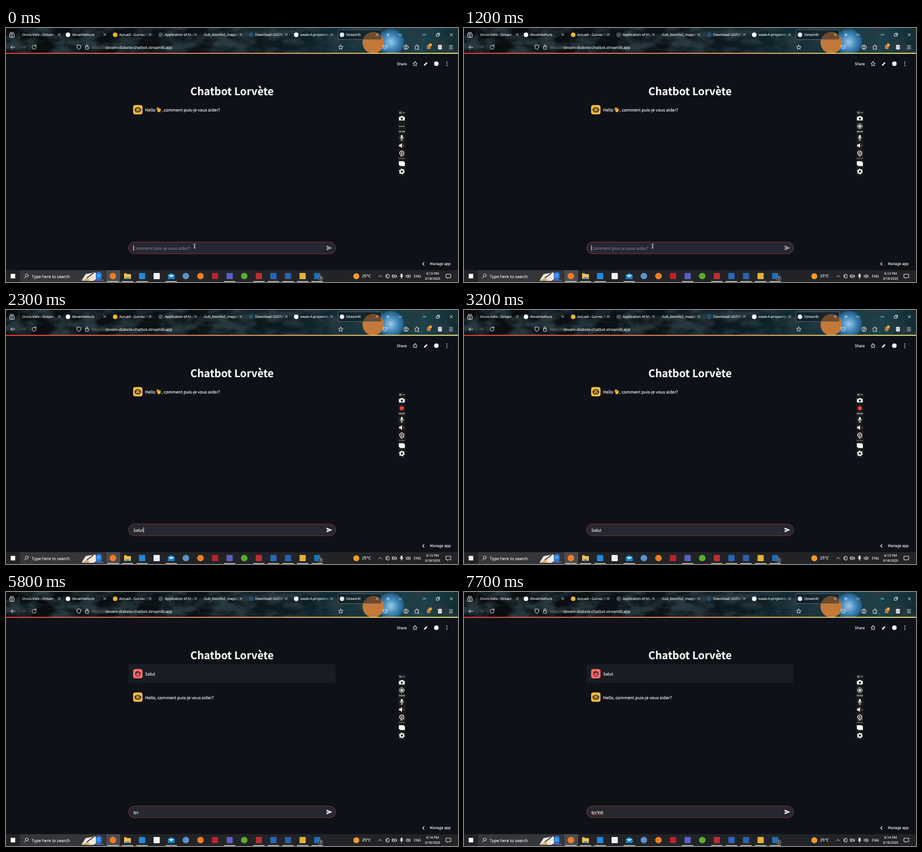
An HTML page that plays this animation: 800 px wide and 450 px high, repeating every 8000 ms.

```html
<!DOCTYPE html>
<html lang="fr">
<head>
<meta charset="utf-8">
<title>Chatbot</title>
<style>
  html, body { margin: 0; width: 100%; height: 100%; overflow: hidden; background: #0e1117; }
  svg { display: block; }
  text { fill: #fafafa; stroke: #fafafa; stroke-width: .12; text-rendering: geometricPrecision; white-space: pre; }
  .app text { font: 7.46px "Noto Sans CJK JP", "Noto Sans CJK SC", "Noto Sans", sans-serif; }
  .app .title { font-size: 18.6px; font-weight: 700; text-anchor: middle; }
  .app .small { font-size: 6.5px; }
  .app .hint { fill: #8b8d95; stroke: none; }
  .ui text { font: 6.15px "Open Sans", "Noto Sans", sans-serif; }
  .line { fill: none; stroke: #f2f2f4; stroke-linecap: round; stroke-linejoin: round; }
  .ink { fill: none; stroke: #11141a; stroke-width: 1.1; stroke-linejoin: round; }
</style>
</head>
<body>
<svg width="800" height="450" viewBox="0 0 800 450">
  <defs>
    <linearGradient id="sky">
      <stop offset="0" stop-color="#090c0f"/><stop offset=".45" stop-color="#0b1216"/>
      <stop offset=".64" stop-color="#0d1d24"/><stop offset=".76" stop-color="#113039"/>
      <stop offset=".92" stop-color="#1b444e"/><stop offset="1" stop-color="#11292f"/>
    </linearGradient>
    <filter id="cloud" x="0" y="0" width="1" height="1">
      <feTurbulence type="fractalNoise" baseFrequency=".025 .05" numOctaves="4" seed="5"/>
      <feColorMatrix values="0 0 0 0 .02  0 0 0 0 .04  0 0 0 0 .05  0 3 0 0 -1.1"/>
    </filter>
    <radialGradient id="glow">
      <stop offset="0" stop-color="#9accea"/><stop offset=".5" stop-color="#4288b9"/>
      <stop offset=".85" stop-color="#235f8a"/><stop offset="1" stop-color="#12394c" stop-opacity="0"/>
    </radialGradient>
    <linearGradient id="bar">
      <stop offset="0" stop-color="#ff4b4b"/><stop offset="1" stop-color="#fffd80"/>
    </linearGradient>
    <linearGradient id="fade" gradientUnits="userSpaceOnUse" x1="-11" x2="0">
      <stop offset="0" stop-color="#f4f4f6"/><stop offset="1" stop-color="#f4f4f6" stop-opacity="0"/>
    </linearGradient>
    <clipPath id="top"><rect width="800" height="44.5"/></clipPath>
    <g id="bot">
      <rect width="16.6" height="16.6" rx="4" fill="#ffbd45"/>
      <path class="ink" d="M8.3 5V3.6M4.6 5.2h7.4v7H4.6zM4.4 7.4H3v2.4h1.4M12.2 7.4h1.4v2.4h-1.4M6.4 10.6h3.8"/>
      <circle cx="6.6" cy="8" r=".9" fill="#11141a"/><circle cx="10" cy="8" r=".9" fill="#11141a"/>
    </g>
    <g id="user">
      <rect width="16.6" height="16.6" rx="4" fill="#ff6c6c"/>
      <circle class="ink" cx="8.3" cy="8.5" r="4.2"/>
      <path class="ink" d="M4.3 7.8Q6.6 7.4 7.4 5.1Q9.2 7.6 12.3 7.2"/>
      <circle cx="6.8" cy="9.3" r=".7" fill="#11141a"/><circle cx="9.9" cy="9.3" r=".7" fill="#11141a"/>
    </g>
    <path id="star" d="M0-4L1.2-1.3 4-1 1.9.9 2.5 3.7 0 2.3-2.5 3.7-1.9.9-4-1-1.2-1.3z"/>
  </defs>

  <g class="ui">
    <g clip-path="url(#top)">
      <rect width="800" height="45" fill="url(#sky)"/>
      <g id="stars"></g>
      <rect width="800" height="45" filter="url(#cloud)"/>
      <circle cx="681" cy="25" r="26" fill="url(#glow)"/>
      <circle cx="650" cy="26" r="19" fill="#c2793a"/>
    </g>
    <rect x="587.5" y="3" width="77" height="17.5" rx="2" fill="#0c1118" fill-opacity=".45" stroke="#747c8a" stroke-width=".7"/>
    <path d="M22.5 3v17" stroke="#3c3d43" stroke-width=".6"/>
    <g id="tabs"></g>
    <g class="line" stroke-width=".9">
      <rect x="6.5" y="10" width="8" height="6.5" rx="1"/><path d="M7.5 8h6M9 12.3h3M9 14.3l1.5 1 1.5-1"/>
      <path d="M673.5 12h5M676 9.5v5M694.5 10.8l3 2.6 3-2.6M738 12h5M762 10.6h4v4h-4zM763.4 9.2h4v4M786 9.8l4.4 4.4M790.4 9.8L786 14.2"/>
      <path d="M15.5 34h-6.6M11.7 31l-3 3 3 3"/>
      <path d="M28.5 34h6M31.7 31.2l3 2.8-3 2.8" stroke="#55565c"/>
      <path d="M52.6 31.6a3.6 3.6 0 1 0 .9 2.4M53.2 29.6v2.4h-2.4"/>
      <path d="M129 30l3.4 1v3q0 2.6-3.4 4-3.4-1.4-3.4-4v-3z"/>
      <rect x="140.5" y="33" width="5.6" height="4.6" rx=".8"/><path d="M141.7 33v-1.5a1.6 1.6 0 0 1 3.2 0V33"/>
      <use href="#star" x="592.5" y="34"/>
      <path d="M667.5 31h7v3a3.5 3.5 0 0 1-7 0zM669.5 33.3l1.5 1.5 1.5-1.5"/>
      <circle cx="708" cy="34" r="4"/><circle cx="708" cy="32.8" r="1.2"/><path d="M705.6 36.7q2.4-2.4 4.8 0"/>
      <path d="M724.5 32h2v-1.2a1 1 0 0 1 2 0V32h2v2h-1a1.2 1.2 0 0 0 0 2.3h1v1.5h-6z"/>
      <path d="M784.5 31.2h6M784.5 34h6M784.5 36.8h6"/>
    </g>
    <rect x="745" y="30" width="6.5" height="7.5" rx="1" fill="#c9793c"/>
    <rect x="748.5" y="27.5" width="5" height="5" rx="1" fill="#e6ad35"/>
    <rect x="764.7" y="30" width="6.6" height="8" rx=".8" fill="#eceef2"/>
    <path d="M766 32.5h4M766 34.3h4M766 36.1h3" stroke="#77808c" stroke-width=".6"/>
    <text x="152.3" y="36.7" style="font-size:6.85px"><tspan fill="#8f9097" stroke="none">https://</tspan>dovam-diabete-chatbot.streamlit.app</text>
  </g>

  <g class="app">
    <rect y="44" width="800" height="1.6" fill="url(#bar)"/>
    <text class="small" x="691.8" y="66">Share</text>
    <g class="line" stroke-width=".9">
      <use href="#star" x="724" y="63.3"/>
      <path d="M740 415.4l-2.6 2.6 2.6 2.6" stroke-width="1.1"/>
    </g>
    <path d="M739.6 66.7l.4-2 4.3-4.3 1.7 1.7-4.3 4.3z" fill="#fafafa"/>
    <circle cx="761.7" cy="63.3" r="4" fill="#fafafa"/>
    <path d="M780.3 60.2v.01M780.3 63.3v.01M780.3 66.4v.01" class="line" stroke-width="1.7"/>
    <text class="title" x="400" y="118.8">Chatbot Lorvète</text>

    <g id="greeting">
      <use href="#bot" x="225" y="136.4"/>
      <text x="246" y="148">Hello</text>
      <g transform="translate(270 145) rotate(-30)" fill="#f6b73c">
        <rect x="-2.8" y="-.6" width="5.6" height="4.6" rx="2"/>
        <path d="M-2-.2v-3M-.6-.4v-4M.8-.4v-3.8M2.1 0v-2.8M2.4 2l1.7-2" stroke="#f6b73c" stroke-width="1.15" stroke-linecap="round"/>
      </g>
      <text x="275.3" y="148">, comment puis-je vous aider?</text>
    </g>
    <g id="question">
      <rect x="216.7" y="128" width="366.6" height="33" rx="4" fill="#1a1c24"/>
      <use href="#user" x="225" y="136.4"/>
      <text x="246" y="148">Salut</text>
    </g>
    <g id="answer">
      <use href="#bot" x="225" y="178"/>
      <text x="246" y="189.6">Hello, comment puis-je vous aider?</text>
    </g>

    <rect x="216.9" y="379.3" width="366.5" height="20.6" rx="10.3" fill="#262730" stroke="#96393f" stroke-width=".8"/>
    <text id="hint" class="hint" x="225.3" y="392.5">Comment puis-je vous aider?</text>
    <text id="entry" x="225.3" y="392.5"></text>
    <path id="spell" d="M226 394.4h21" stroke="#e5484d" stroke-width=".9" stroke-dasharray="1.3 .6"/>
    <rect id="caret" y="384.7" width=".8" height="10" fill="#e8e8ea"/>
    <path id="send" d="M567.5 385.6l10 4.1-10 4.1v-3.2l6-.9-6-.9z"/>
    <path id="mouse" class="line" stroke-width=".75" d="M332 382.6q1.8 0 1.8 1v5.6q0 1-1.8 1M335.6 382.6q-1.8 0-1.8 1v5.6q0 1 1.8 1"/>
    <text class="small" x="750.2" y="420.3">Manage app</text>
  </g>

  <g class="ui">
    <rect x="694" y="146" width="13" height="116" rx="1" fill="#191a1c"/>
    <path d="M697 148.8h2.6v2.4H697zM702 150h4" class="line" stroke-width=".7"/>
    <path d="M695.5 157.5h2.4l1-1.4h3.4l1 1.4h2.4v6.3h-10.2z" fill="#fff"/>
    <circle cx="700.6" cy="160.5" r="1.9" fill="#191a1c"/>
    <path id="dots" class="line" stroke-width="1.9" d="M697 174.3h.01M700.5 174.3h.01M704 174.3h.01"/>
    <g id="ring"><circle cx="700.5" cy="174" r="4.3" class="line" stroke-width="1"/><circle cx="700.5" cy="174" r="2.6" fill="#d7d7d9"/></g>
    <g id="rec"><circle cx="700.5" cy="174" r="4.5" fill="#6a1f24"/><circle cx="700.5" cy="174" r="3.2" fill="#ef4046"/></g>
    <text id="timer" x="700.5" y="184.6" text-anchor="middle" style="font-size:4.2px"></text>
    <rect x="698.8" y="189.6" width="3.4" height="6" rx="1.7" fill="#fff"/>
    <path class="line" stroke-width=".8" d="M697.2 193.8a3.3 3.3 0 0 0 6.6 0M700.5 197.2v1.6M698.8 199h3.4"/>
    <path d="M695.8 206.4h2l3-2.4v8.4l-3-2.4h-2z" fill="#fff"/>
    <path d="M702.6 206.8l2.6 2.8M705.2 206.8l-2.6 2.8" stroke="#e64b50" stroke-width=".9"/>
    <circle cx="700.5" cy="221.5" r="3.6" fill="none" stroke="#fff" stroke-width="1.4"/>
    <circle cx="700.5" cy="221.5" r="1.3" fill="#fff"/><path d="M698 227h4" stroke="#fff"/>
    <circle cx="703.7" cy="225.3" r="1.3" fill="#e64b50"/>
    <path d="M695 231.2h11" stroke="#b6b6b8" stroke-width=".9" stroke-dasharray="1.2 .4"/>
    <path d="M695.4 236h8.6v1.5h2v7h-9v-1.6h-1.6z" fill="#fff"/>
    <circle cx="700.6" cy="254.2" r="3" fill="none" stroke="#fff" stroke-width="2"/>
    <circle cx="700.6" cy="254.2" r="4.4" fill="none" stroke="#fff" stroke-width="1.4" stroke-dasharray="2.3 2.3"/>
  </g>

  <g class="ui">
    <rect y="429" width="800" height="21" fill="#222326"/>
    <rect x="25" y="429" width="151" height="21" fill="#353639"/>
    <rect x="177" y="429" width="25" height="21" fill="#4a4b4e"/>
    <rect x="8.3" y="435.6" width="8" height="8" fill="#fff"/>
    <g class="line" stroke-width=".9">
      <circle cx="36.8" cy="438.5" r="2.6"/><path d="M35 440.5l-3 3"/>
      <path d="M659.5 441l2.8-2.7 2.8 2.7"/>
      <rect x="674" y="436.5" width="4" height="6.5" rx="1"/><path d="M672.5 437.5v4.5"/>
      <rect x="683.5" y="437.8" width="7" height="4" rx=".5"/><path d="M691.2 439v1.5M685 439.8h3" stroke-width="1.1"/>
      <rect x="698.8" y="435.7" width="2.6" height="5" rx="1.3" fill="#f2f2f4"/><path d="M697.5 440q2.6 4 5.2 0M700.1 442v2"/>
      <path d="M708.5 438.6h1.3l2-1.8v6l-2-1.8h-1.3zM713.2 438.4q1 1.4 0 2.8M714.8 437.2q2 2.6 0 5.2"/>
      <path d="M779 436.2h8.2v6h-4l-1.8 1.7v-1.7H779z"/>
    </g>
    <text x="45.5" y="442.6" style="font-size:7.4px">Type here to search</text>
    <path d="M134 447l7-11 17-3 5 9-8 6h-20z" fill="#efe8dc"/>
    <path d="M135 447l8-4 6 3-4 2h-9z" fill="#dfa86c"/>
    <path d="M143 443l12-9" stroke="#3f3a3a" stroke-width="1.6"/>
    <rect x="159" y="432" width="10.5" height="14.5" rx="5" fill="#2479d8"/>
    <path d="M161 437h6M161 440h6" stroke="#9cd0fa"/>
    <path d="M157 447h16" stroke="#7958b5" stroke-width="1.6"/>
    <g id="apps"></g>
    <circle cx="557" cy="443.3" r="4" fill="#2a2d33" stroke="#d8dade" stroke-width=".5"/>
    <text x="557" y="445.3" text-anchor="middle" style="font-size:5.6px">5</text>
    <circle cx="620" cy="439.7" r="5.3" fill="#f39a2d"/>
    <text x="630" y="442.4" style="font-size:7.2px">25°C</text>
    <text x="722" y="442">ENG</text>
    <text id="clock" x="755" y="437.4" text-anchor="middle" style="font-size:5.9px"></text>
    <text x="755" y="446.2" text-anchor="middle" style="font-size:5.7px">3/18/2025</text>
  </g>
</svg>
<script>
const $ = id => document.getElementById(id);

// Browser tabs: label, icon colour, text start
const tabs = [
  ['Oruni-Velo - Stream', '', 28.5],
  ['dovamkelture', '#fff', 117],
  ['Accueil - Gurvex Dri', '#e9b52f', 200.5],
  ['Application of Mach', '#46525c', 281],
  ['club_bioinfo2_mapping', '', 350],
  ['Download UGENE', '#24506f', 441],
  ['week-4-project-tea', '#fff', 521],
  ['Streamlit', '#e4e5ea', 602]
];
$('tabs').innerHTML = tabs.map(([label, color, x], i) => {
  const close = 94.4 + i * 80.35, end = close - 2.5;
  return (color ? `<circle cx="${x - 7.3}" cy="12" r="4" fill="${color}"/>` : '') +
    `<g transform="translate(${end} 14.2)"><text x="${x - end}" style="fill:url(#fade);stroke:url(#fade)">${label}</text></g>` +
    `<path class="line" stroke-width=".8" d="M${close - 2} 9.7l4 4m0-4l-4 4"/>`;
}).join('');

// Taskbar: shape, colour, open
const apps = [
  ['o', '#f47b28', 1], ['f', '#f3c04b', 1], ['s', '#2489d8', 1], ['s', '#f0f1f3', 0], ['m', '#1689d6', 1],
  ['o', '#5b93c9', 0], ['o', '#ee7d27', 0], ['s', '#b8232c', 0], ['s', '#5b5fc0', 1], ['o', '#58ad2d', 0],
  ['s', '#b92f36', 1], ['s', '#2766bd', 1], ['s', '#2b62a5', 1], ['s', '#e0b23c', 1], ['s', '#1c70b7', 1]
];
const shapes = {
  o: c => `<circle r="5.8" fill="${c}"/>`,
  s: c => `<rect x="-5.5" y="-5.5" width="11" height="11" rx="1" fill="${c}"/>`,
  f: c => `<path d="M-6-5h4l1.4 1.4H6V5H-6z" fill="${c}"/><path d="M-3.5 5V2.2h7V5" fill="#3f8fd2"/>`,
  m: c => `<path d="M-6-2L0-5.5 6-2v7.3H-6z" fill="${c}"/><path d="M-5-1.8H5L0 2z" fill="#e8f2fa"/>`
};
$('apps').innerHTML = apps.map(([kind, color, open], i) =>
  `<g transform="translate(${189.2 + i * 25.83} 439.5)">${shapes[kind](color)}` +
  (open ? '<rect x="-10" y="9.1" width="20" height="1.4" fill="#d8d0c2"/>' : '') + '</g>').join('');

// Star field in the window theme
let seed = 7;
const rnd = () => (seed = seed * 16807 % 2147483647) / 2147483647;
$('stars').innerHTML = Array.from({ length: 70 }, () =>
  `<circle cx="${560 + rnd() * 240}" cy="${rnd() * 44}" r="${.2 + rnd() * .5}" fill="#a5cbd0" opacity="${.2 + rnd() * .5}"/>`).join('');

const typed = [
  [0, ''], [1900, 'S'], [2000, 'Sa'], [2100, 'Sal'], [2200, 'Salu'], [2300, 'Salut'], [3500, ''],
  [5800, 'qu'], [6500, 'qu\'e'], [6700, 'qu\'es'], [6900, 'qu\'est']
];
const caretOn = [[0, 400], [930, 1460], [1900, 2800], [3300, 3500], [6100, 7430]];
const at = (steps, t) => steps.filter(s => s[0] <= t).pop()[1];
const within = (spans, t) => spans.some(([a, b]) => t >= a && t < b);
const show = (id, on) => $(id).style.display = on ? '' : 'none';
const write = (id, s) => { if ($(id).textContent !== s) $(id).textContent = s; };

function draw(t) {
  const entry = at(typed, t);
  write('entry', entry);
  write('timer', t < 400 ? '02:08' : '00:00');
  write('clock', t < 5800 ? '6:13 PM' : '6:14 PM');
  show('hint', !entry);
  show('mouse', t < 1900);
  show('greeting', t < 3500);
  show('question', t >= 3500);
  show('answer', t >= 3700);
  show('spell', t >= 7100);
  show('caret', within(caretOn, t));
  $('caret').setAttribute('x', 225.2 + (entry ? $('entry').getComputedTextLength() : 0));
  $('send').setAttribute('fill', entry ? '#f2f3f5' : '#a3a5ab');

  const red = t % 1000 < 500 && within([[2000, 3500], [6100, 8000]], t);
  show('dots', t < 1000);
  show('ring', t >= 1000 && !red);
  show('rec', red);
}

const start = performance.now();
function tick() {
  draw((performance.now() - start) % 8000);
  requestAnimationFrame(tick);
}
tick();
</script>
</body>
</html>
```
